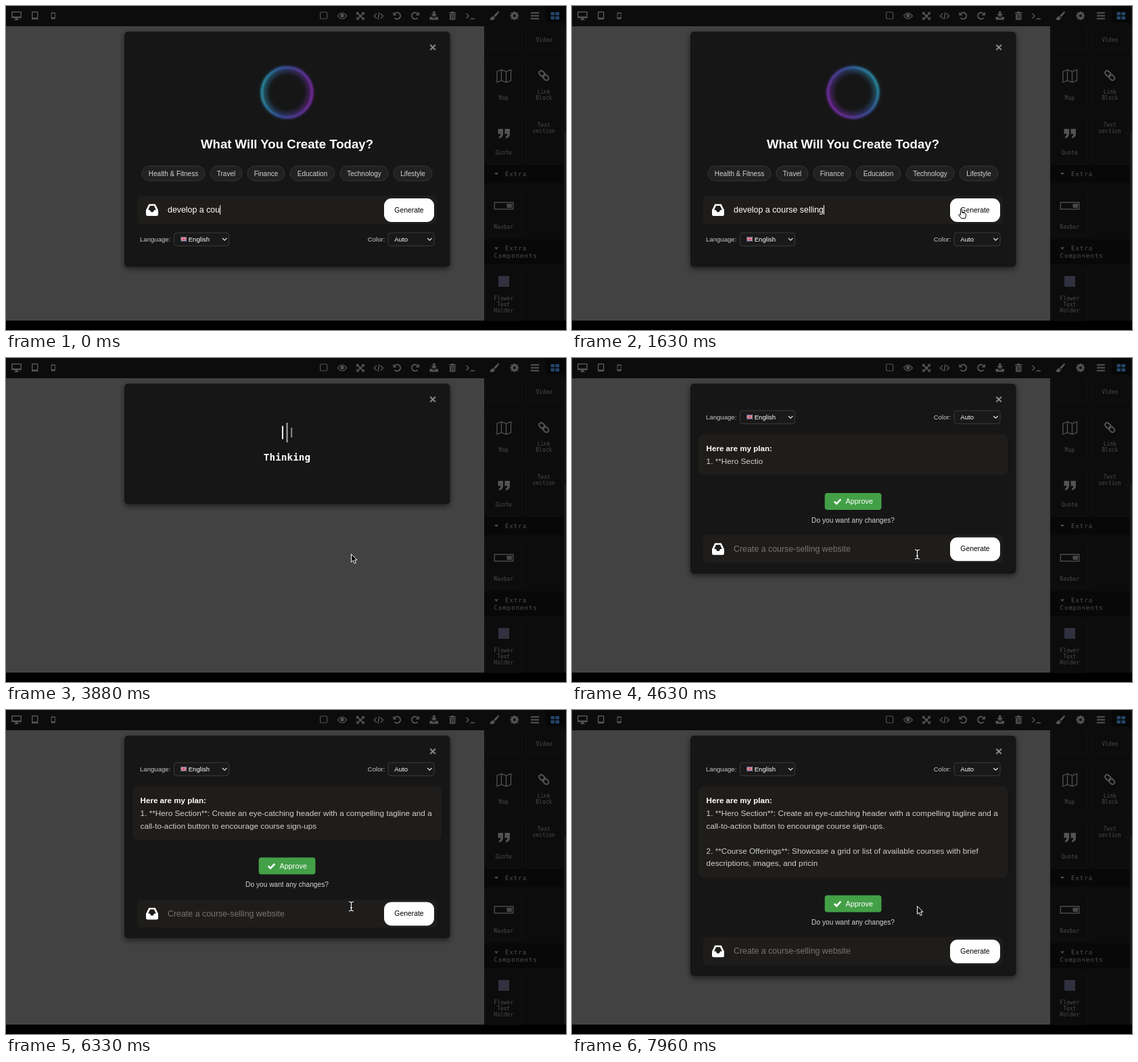
Recreate the animation shown at these times as an HTML page. Size 828x480 px, loop 8000 ms.

```html
<!DOCTYPE html>
<html lang="en">
<head>
<meta charset="utf-8">
<title>Site builder assistant</title>
<style>
html, body { margin: 0; width: 100%; height: 100%; overflow: hidden; background: #000; }
svg { display: block; width: 828px; height: 480px; font-family: "Liberation Sans", Arial, sans-serif; }
.mono { font-family: "DejaVu Sans Mono", monospace; }
.mid { text-anchor: middle; }
.line { fill: none; stroke: #535353; stroke-width: 1.5; }
.side { font-size: 8px; fill: #4b4b4b; }
.head { font-size: 9px; letter-spacing: 1px; fill: #525252; }
.cell { fill: #0c0c0c; stroke: #121212; }
.chip { fill: #212121; stroke: #343434; }
.small { font-size: 9.6px; fill: #c8c8c8; }
.body { font-size: 11.75px; fill: #cfcfcf; }
</style>
</head>
<body>
<svg viewBox="0 0 828 480" xmlns="http://www.w3.org/2000/svg">
  <defs>
    <linearGradient id="hue">
      <stop offset="0" stop-color="#2c93ad"/>
      <stop offset=".4" stop-color="#3a55a6"/>
      <stop offset="1" stop-color="#7a2ba6"/>
    </linearGradient>
    <filter id="soft" x="-20%" y="-20%" width="140%" height="140%"><feGaussianBlur stdDeviation="1"/></filter>
    <filter id="haze" x="-30%" y="-30%" width="160%" height="160%"><feGaussianBlur stdDeviation="3"/></filter>
    <filter id="drop" x="-10%" y="-10%" width="120%" height="125%">
      <feDropShadow dx="0" dy="3" stdDeviation="4" flood-color="#000" flood-opacity=".55"/>
    </filter>
  </defs>

  <rect width="828" height="480" fill="#000"/>
  <rect y="30" width="707" height="436" fill="#424242"/>
  <rect width="828" height="30" fill="#0c0c0c"/>
  <rect x="707" y="30" width="121" height="436" fill="#0c0c0c"/>
  <g id="tools"></g>
  <g id="side"></g>

  <rect id="modal" x="175" y="38" width="481.5" rx="5" fill="#191919" filter="url(#drop)"/>
  <path d="M627.3 57.5l7.6 7.6m0-7.6l-7.6 7.6" stroke="#8c8c8c" stroke-width="2"/>

  <g id="intro">
    <g id="orb" fill="none" stroke="url(#hue)">
      <circle cx="415.5" cy="128" r="34" stroke-width="8" opacity=".5" filter="url(#haze)"/>
      <circle cx="415.5" cy="128" r="37" stroke-width="4" opacity=".85" filter="url(#soft)"/>
    </g>
    <text class="mid" x="415.5" y="211" font-size="18.6" font-weight="bold" fill="#fff">What Will You Create Today?</text>
    <g id="chips"></g>
  </g>

  <g id="wait">
    <g id="bars"></g>
    <text class="mono mid" x="415.5" y="152" font-size="14.4" font-weight="bold" fill="#fff">Thinking</text>
  </g>

  <g id="plan">
    <rect id="sheet" x="187" y="113" width="457" rx="7" fill="#1f1d1b"/>
    <text x="198.6" y="138" font-size="11.6" font-weight="bold" fill="#fff">Here are my plan:</text>
    <g id="lines"></g>
    <g id="approve">
      <rect x="373.7" y="200" width="83.8" height="25" rx="4" fill="#43a047"/>
      <path d="M387.8 212.6l3.4 3.3 6.2-6.6" fill="none" stroke="#fff" stroke-width="2.6"/>
      <text x="404.4" y="216.2" font-size="10.9" fill="#fff">Approve</text>
      <text class="mid" x="415.5" y="243.5" font-size="10.2" fill="#d4d4d4">Do you want any changes?</text>
    </g>
  </g>

  <g id="form">
    <rect x="194" y="281" width="443" height="42" rx="6" fill="#1f1d1b"/>
    <path d="M211.3 293.5h9.4l4.3 8.8v6.2q0 2.5-2.5 2.5h-13q-2.5 0-2.5-2.5v-6.2zM213 296l-2.8 6.2h2.6l1.6 3h3.2l1.6-3h2.6l-2.8-6.2z" fill="#fff" fill-rule="evenodd"/>
    <text id="typed" x="239" y="306.2" font-size="12.4" fill="#fff"></text>
    <rect id="caret" y="295" width="1" height="14" fill="#fff"/>
    <text id="hint" x="239" y="306.2" font-size="12.4" fill="#757575">Create a course-selling website</text>
    <rect x="559" y="285" width="74" height="35" rx="11" fill="#fff"/>
    <text class="mid" x="596" y="305.7" font-size="10.4" fill="#000">Generate</text>
  </g>

  <g id="opts">
    <text class="small" x="198" y="348.8">Language:</text>
    <rect x="248.5" y="336" width="81" height="19.3" rx="3.5" fill="#191919" stroke="#3b3b3b"/>
    <rect x="258.5" y="342" width="8.5" height="6.6" fill="#3a3f78"/>
    <path d="M258.5 342l8.5 6.6m0-6.6l-8.5 6.6" stroke="#dcc9d2"/>
    <path d="M262.75 342v6.6M258.5 345.3h8.5" stroke="#eee" stroke-width="2.4"/>
    <path d="M262.75 342v6.6M258.5 345.3h8.5" stroke="#d0334c" stroke-width="1.3"/>
    <text class="small" x="269.7" y="348.8" style="fill:#fff">English</text>
    <text class="small" x="534.8" y="348.8">Color:</text>
    <rect x="565" y="336" width="68" height="19.3" rx="3.5" fill="#191919" stroke="#3b3b3b"/>
    <text class="small" x="574.3" y="348.8" style="fill:#fff">Auto</text>
    <path d="M320 344l3.2 3.2 3.2-3.2M623.2 344l3.2 3.2 3.2-3.2" fill="none" stroke="#ddd" stroke-width="1.3"/>
  </g>

  <path id="arrow" d="M0 0v11.8l2.7-2.5 2 4.5 2.2-.9-2-4.4h3.7z" fill="#000" stroke="#fff"/>
  <g id="beam" fill="none">
    <path id="ibar" d="M-3.5-6.5q3 0 3.5 1.5q.5-1.5 3.5-1.5M0-5v10.500M-3.500 7q3 0 3.500-1.500q.5 1.500 3.500 1.500M-1.500 2.500h3" stroke="#000" stroke-width="3"/>
    <path d="M-3.5-6.5q3 0 3.5 1.5q.5-1.5 3.5-1.5M0-5v10.500M-3.500 7q3 0 3.500-1.500q.5 1.500 3.500 1.500M-1.500 2.500h3" stroke="#fff" stroke-width="1.3"/>
  </g>
  <path id="hand" d="M-1 0q1-1 2 0v5l5 1.200q1.500.5 1 3l-1 4.500h-6l-4-5q0-1.500 3-.2z" fill="#fff" stroke="#000"/>
</svg>
<script>
const $ = id => document.getElementById(id);
const show = (id, on) => $(id).setAttribute('display', on ? 'inline' : 'none');
const move = (id, x, y) => $(id).setAttribute('transform', `translate(${x} ${y})`);
const clamp = (v, a, b) => Math.min(b, Math.max(a, v));

const stroke = (d, extra = '') => `<path class="line" d="${d}" ${extra}/>`;
const solid = (d, color = '#535353') => `<path d="${d}" fill="${color}" fill-rule="evenodd"/>`;

const teeth = Array.from({ length: 8 }, (_, i) =>
  `<rect x="750.4" y="8.100" width="2.800" height="3" fill="#535353" transform="rotate(${i * 45} 751.8 14.500)"/>`).join('');

$('tools').innerHTML =
  '<rect x="798" width="28" height="29" fill="#070707"/>' +
  solid('M9 8h13q1 0 1 1v8q0 1-1 1h-5l.6 2h1.400v1h-7v-1h1.400l.6-2h-5q-1 0-1-1v-8q0-1 1-1zM9.500 9.500v6h12v-6z') +
  solid('M39 8h7.500q1 0 1 1v10q0 1-1 1h-7.500q-1 0-1-1v-10q0-1 1-1zM39.500 9.500v7.800h6.500v-7.800z') +
  solid('M67.800 9.500h4q1.200 0 1.200 1v8q0 1-1.200 1h-4q-1.200 0-1.200-1v-8q0-1 1.200-1zM67.700 11.300v5.400h4.300v-5.400z') +
  '<rect class="line" x="464.700" y="9" width="10" height="10" rx="1.500" style="stroke-width:1.200"/>' +
  stroke('M490.500 14.700q6.500-8.500 13 0q-6.500 8.500-13 0z', 'style="stroke-width:1.300"') +
  '<circle cx="497" cy="14.200" r="2.700" fill="#535353"/>' +
  stroke('M520 11l8 8m0-8l-8 8', 'style="stroke-width:2"') +
  solid('M518 9h4.500l-4.500 4.500zM530 9h-4.500l4.500 4.500zM518 20.500h4.500l-4.500-4.500zM530 20.500h-4.500l4.500-4.500z') +
  stroke('M548 11l-3.500 3.700 3.500 3.700M554 11l3.500 3.700-3.500 3.700M552 9.500l-2 10.500') +
  stroke('M574.300 12a4.800 4.800 0 1 1 .3 5.600', 'style="stroke-width:1.900"') + solid('M572.300 8.700v5.300h5.300z') +
  stroke('M608.900 12a4.800 4.800 0 1 0-.3 5.600', 'style="stroke-width:1.900"') + solid('M611 8.700v5.300h-5.300z') +
  solid('M631 8h3.500v4h3l-4.700 4.500-4.700-4.500h3zM626.500 16h3l3.200 2.500 3.200-2.500h3v4.500h-12.400z') +
  solid('M655 9.500h3l1-1.500h2.500l1 1.500h3v1.400h-10.500zM656 11.800h8.500v7.700q0 1-1 1h-6.500q-1 0-1-1zM658 13v6h.8v-6zM660 13v6h.8v-6zM662 13v6h.8v-6z') +
  stroke('M680.500 11l3.700 3.700-3.700 3.700M686.500 19h6.500') +
  solid('M728 8q1.600.3.700 2l-5 6.500-2.600-2.200 5.600-5.800q.6-.6 1.300-.5zM720.300 15l2.600 2.300q-.5 4-4.700 3.700-2.300 0-3.200-2.300 1.700 0 2.300-1.700.8-2 3-2z') +
  teeth + '<circle cx="751.800" cy="14.500" r="3.400" fill="none" stroke="#535353" stroke-width="2.800"/>' +
  stroke('M776 10.300h12M776 14.500h12M776 18.700h12', 'style="stroke-width:2"') +
  solid('M805.500 9h5.600v4.800h-5.600zM812.500 9h5.600v4.800h-5.600zM805.500 15.200h5.600v4.800h-5.600zM812.500 15.200h5.600v4.800h-5.600z', '#25456a');

const cell = (x, y, h) => `<rect class="cell" x="${x}" y="${y}" width="53" height="${h}" rx="2"/>`;
const label = (x, y, words) => words.split(' ').map((w, i) =>
  `<text class="mono side mid" x="${x}" y="${y + i * 9.200}">${w}</text>`).join('');
const head = (y, h) => `<rect x="707" y="${y}" width="118" height="${h}" fill="#080808"/>` +
  solid(`M722 ${y + 12}h6l-3 3.200z`) + `<text class="mono head" x="738" y="${y + 16.500}">Extra</text>`;
const quote = x => solid(`M${x} 182h7.500v7q0 6-6 7v-2.500q2.500-.8 2.500-4h-4z`);

$('side').innerHTML =
  cell(709.500, 26, 38) + cell(769.500, 26, 38) + cell(709.500, 78, 72) + cell(769.500, 78, 72) +
  cell(709.500, 162, 72) + cell(769.500, 162, 72) + cell(709.500, 269, 71) + cell(709.500, 390, 76) +
  '<rect x="707" y="24" width="121" height="6" fill="#0c0c0c"/>' +
  '<rect x="825" y="30" width="3" height="436" fill="#111"/><rect x="825" y="188" width="3" height="278" fill="#1b1b1b"/>' +
  head(235, 27) + head(345.500, 37) + '<text class="mono head" x="721.600" y="373">Components</text>' +
  label(795.500, 52.800, 'Video') + label(735.800, 139, 'Map') + label(795.300, 129.500, 'Link Block') +
  label(735.800, 220, 'Quote') + label(795.300, 178.500, 'Text section') +
  label(735.800, 330.300, 'Navbar') + label(735.800, 435.500, 'Flower Text Holder') +
  stroke('M726 97l6.500-2.500 7 2.500 7-2.500v16l-7 2.500-7-2.500-6.500 2.500zM732.500 94.500v16M739.500 97v16', 'style="stroke-width:1.300"') +
  '<g transform="rotate(45 795.300 103)"><rect class="line" x="786.500" y="99.800" width="9.500" height="6.400" rx="3.200" style="stroke-width:2"/>' +
  '<rect class="line" x="794.500" y="99.800" width="9.500" height="6.400" rx="3.200" style="stroke-width:2"/></g>' +
  quote(727.500) + quote(737.500) +
  '<rect class="line" x="722.300" y="291" width="27.500" height="10" style="stroke-width:1.300"/>' +
  '<rect x="740.500" y="293" width="7.500" height="6" fill="#474747"/>' +
  '<rect x="728" y="400" width="16" height="16" fill="#30303f"/>';

const chips = [['Health & Fitness', 201, 294], ['Travel', 302, 349], ['Finance', 357, 412],
  ['Education', 420, 486], ['Technology', 494, 565], ['Lifestyle', 573, 630]];
$('chips').innerHTML = chips.map(([name, a, b]) =>
  `<rect class="chip" x="${a}" y="237" width="${b - a}" height="22" rx="11"/>` +
  `<text class="mid" x="${(a + b) / 2}" y="251.700" font-size="10" fill="#d2d2d2">${name.replace('&', '&amp;')}</text>`).join('');

$('bars').innerHTML = '<rect width="2" rx=".8" fill="#fff"/>'.repeat(3);

const rows = [
  '1. **Hero Section**: Create an eye-catching header with a compelling tagline and a ',
  'call-to-action button to encourage course sign-ups.\n',
  '\n',
  '2. **Course Offerings**: Showcase a grid or list of available courses with brief ',
  'descriptions, images, and pricing'
];
const STEP = 18.6;
$('lines').innerHTML = rows.map((_, i) => `<text class="body" x="198.600" y="${157 + i * STEP}"></text>`).join('');

const LOOP = 8000, ASK = 1920, ANSWER = 4400;
const prompt = 'develop a course selling';

// Linear interpolation through [time, value] points.
function along(points, t) {
  if (t <= points[0][0]) return points[0][1];
  for (let i = 1; i < points.length; i++) {
    const [a, u] = points[i - 1], [b, v] = points[i];
    if (t < b) return u + (v - u) * (t - a) / (b - a);
  }
  return points[points.length - 1][1];
}
const pace = [[ANSWER, 0], [4630, 16.2], [5580, 84], [6330, 133.2], [7960, 249.2], [8000, 251]];

function drawIntro(t) {
  $('orb').setAttribute('transform', `rotate(${5 + t * 360 / 4000} 415.5 128)`);
  const keys = t < 80 ? 13 : 14 + Math.floor((t - 80) / 42);
  $('typed').textContent = prompt.slice(0, keys);
  $('caret').setAttribute('x', 239 + $('typed').getComputedTextLength());
  show('caret', t < 1000 || t >= 1500);
}

function drawBars(t) {
  [...$('bars').children].forEach((bar, i) => {
    const s = (t - 2250 - i * 250) / 1250;
    const phase = s < 0 ? 0 : s % 1;
    const p = phase < .6 ? Math.sin(Math.PI * phase / .6) ** 2 : 0;
    const h = (i === 1 ? 27 : 15) * (1 + .32 * p);
    bar.setAttribute('x', 408 + i * 6.6);
    bar.setAttribute('y', 110.5 - h / 2);
    bar.setAttribute('height', h);
    bar.setAttribute('opacity', .5 + .5 * p);
  });
}

// Types the answer and returns the number of rows it fills.
function drawPlan(t) {
  const clock = t >= 5630 && t < 5790 ? 5630 : t;
  let left = Math.floor(along(pace, clock)), used = 1;
  rows.forEach((row, i) => {
    const part = row.slice(0, Math.max(0, left)).trimEnd();
    $('lines').children[i].textContent = part;
    if (part) used = i + 1;
    left -= row.length;
  });
  $('sheet').setAttribute('height', 60.8 + (used - 1) * STEP);
  move('approve', 0, (used - 1) * STEP);
  return used;
}

function drawPointer(t, used) {
  let kind = 'arrow', x, y;
  if (t < ASK) {
    const k = clamp((t - 1350) / 400, 0, 1);
    x = 500 + 107.5 * k; y = 309 - 11.5 * k;
    kind = t < 1350 ? '' : x < 559 ? 'beam' : 'hand';
  } else {
    const k = clamp((t - 2250) / 700, 0, 1), e = k * k * (3 - 2 * k);
    x = 608 - 97.5 * e; y = 297.3 - 6.7 * e;
    if (t >= ANSWER && used < 4) kind = 'beam';
  }
  for (const id of ['arrow', 'beam', 'hand']) {
    show(id, id === kind);
    move(id, x, y);
  }
}

function draw(t) {
  const intro = t < ASK, plan = t >= ANSWER;
  show('intro', intro);
  show('wait', !intro && !plan);
  show('plan', plan);
  show('form', intro || plan);
  show('opts', intro || plan);
  show('typed', intro);
  show('hint', plan);
  show('caret', false);
  let bottom = intro ? 386.5 : 216.5, used = 1;
  if (intro) drawIntro(t);
  else if (!plan) drawBars(t);
  else {
    used = drawPlan(t);
    bottom = 319.5 + (used - 1) * STEP;
  }
  $('modal').setAttribute('height', bottom - 38);
  move('form', 0, plan ? -19.2 + (used - 1) * STEP : 0);
  move('opts', 0, plan ? -258 : 0);
  drawPointer(t, used);
}

const start = performance.now();
function tick() {
  draw((performance.now() - start) % LOOP);
  requestAnimationFrame(tick);
}
draw(0);
requestAnimationFrame(tick);
</script>
</body>
</html>
```
